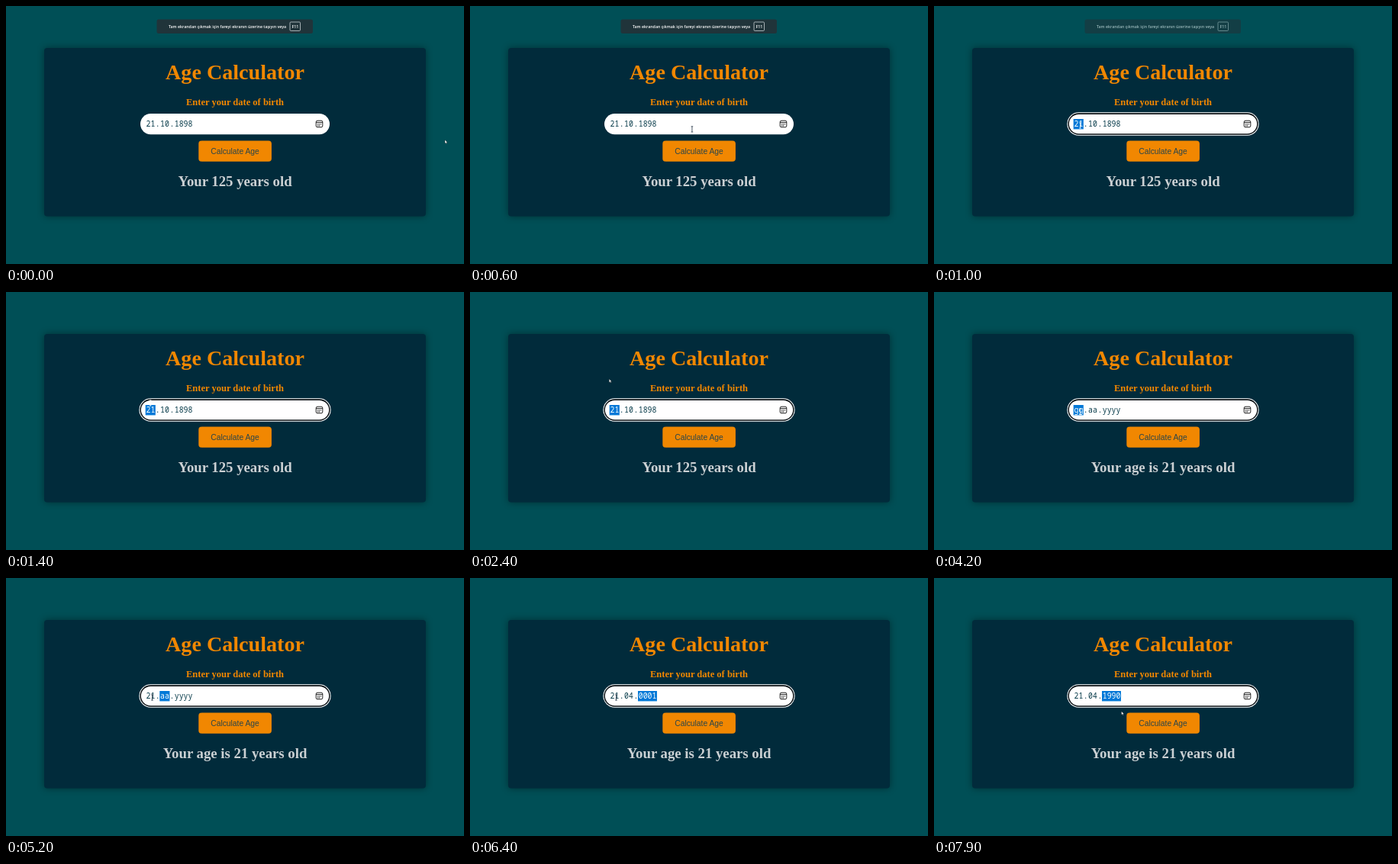
Animation of 600x338 px, one loop 8 s. Source, as an HTML page:

```html
<!DOCTYPE html>
<html lang="en">
<head>
<meta charset="utf-8">
<title>Age Calculator</title>
<style>
  html, body { margin: 0; width: 100%; height: 100%; overflow: hidden; background: #004f56; }
  svg { display: block; width: 600px; height: 338px; }
  .serif { font-family: "Liberation Serif", serif; font-weight: bold; text-anchor: middle; }
  .date { font: 9.85px "Noto Sans Mono", monospace; }
  .toast { font: 600 5.28px "Open Sans", sans-serif; fill: #fff; }
  .panel { filter: drop-shadow(0 0 5px #0006); }
</style>
</head>
<body>
<svg viewBox="0 0 600 338">
  <rect width="600" height="338" fill="#004f56"/>
  <rect class="panel" x="50" y="55" width="500" height="220.5" rx="4" fill="#012b3b"/>

  <g id="toast" class="toast">
    <rect x="197.5" y="17.5" width="204.5" height="18.5" rx="2.5" fill="#20343a"/>
    <text x="213" y="28.5">Tam ekrandan çıkmak için fareyi ekranın üzerine taşıyın veya</text>
    <rect x="372" y="21" width="13.5" height="11.5" rx="1.2" fill="none" stroke="#c8d0d2" stroke-width=".8"/>
    <text x="378.8" y="28.8" text-anchor="middle">F11</text>
  </g>

  <g class="serif">
    <text x="300" y="96" font-size="28.125" fill="#f18701">Age Calculator</text>
    <text x="300" y="130" font-size="12.5" fill="#f18701">Enter your date of birth</text>
    <text id="result" x="300" y="236.3" font-size="18.75" fill="#cbd0d3"></text>
  </g>

  <g id="ring">
    <rect x="174.4" y="139.3" width="251.2" height="30.4" rx="15.2" fill="#fff"/>
    <rect x="175.4" y="140.3" width="249.2" height="28.4" rx="14.2" fill="#0b1115"/>
  </g>
  <rect id="field" fill="#fff"/>
  <g id="date" class="date"></g>

  <g fill="none" stroke="#222" stroke-width="1">
    <rect x="406.2" y="150.2" width="8.6" height="8.6" rx="1.8"/>
    <path d="M406.2 152.6h8.6"/>
    <path d="M408 154.9h5M408 156.9h3.2" stroke-width="1.1" stroke-dasharray="1.1 .8"/>
  </g>

  <rect x="252.3" y="176.4" width="95.6" height="27.4" rx="4" fill="#f18701"/>
  <text x="300" y="193.6" text-anchor="middle" font-family="Liberation Sans, sans-serif" font-size="10.3" fill="#2b464a">Calculate Age</text>

  <path id="arrow" d="M0 0V4.4L1.1 3.5L1.8 5L2.6 4.6L1.9 3.2H3.2Z" fill="#fff" stroke="#111" stroke-width=".3"/>
  <path id="beam" d="M-1.3-3.6H1.3M0-3.6V3.6M-1.3 3.6H1.3" fill="none" stroke-width=".8"/>
</svg>
<script>
const $ = id => document.getElementById(id);
const LOOP = 8000, STEP = 100;

// start time, date shown, selected part (-1: not focused)
const states = [
  [0, '21.10.1898', -1],
  [1000, '21.10.1898', 0],
  [2600, 'gg.aa.yyyy', -1],
  [4200, 'gg.aa.yyyy', 0],
  [4500, '02.aa.yyyy', 0],
  [5200, '21.aa.yyyy', 1],
  [5600, '21.00.yyyy', 1],
  [6000, '21.04.yyyy', 2],
  [6400, '21.04.0001', 2],
  [6800, '21.04.0019', 2],
  [7000, '21.04.0199', 2],
  [7300, '21.04.1990', 2]
];
// pointer: time, x, y
const path = [
  [0, 575, 175.5], [900, 191.5, 156.5], [1200, 191.5, 156.5], [1800, 182.3, 114],
  [2700, 182.3, 114], [3300, 191.5, 156.5], [7700, 191.5, 156.5], [7900, 245.6, 174.8]
];
const partX = [183.5, 202.1, 220.8];
const ease = k => k * k * (3 - 2 * k);
const clamp = k => Math.min(1, Math.max(0, k));

function pointerAt(t) {
  const i = path.findLastIndex(p => p[0] <= t);
  const a = path[i], b = path[i + 1] || a;
  const k = b === a ? 0 : ease((t - a[0]) / (b[0] - a[0]));
  return [a[1] + (b[1] - a[1]) * k, a[2] + (b[2] - a[2]) * k];
}

function setField(focused) {
  const inset = focused ? .9 : 0;
  const box = { x: 176 + inset, y: 141 + inset, width: 248 - 2 * inset, height: 27.2 - 2 * inset, rx: 13.6 - inset };
  for (const key in box) $('field').setAttribute(key, box[key]);
  $('ring').style.display = focused ? '' : 'none';
}

function dateMarkup(date, selected) {
  return date.split('.').map((part, i) => {
    const x = partX[i], on = i === selected, width = part.length * 5.91;
    const mark = on ? `<rect x="${x - .8}" y="148" width="${width + 1.3}" height="13.4" fill="#0078d7"/>` : '';
    const dot = i < 2 ? `<text x="${x + 12.3}" y="158.4" fill="#063a49">.</text>` : '';
    return `${mark}<text x="${x}" y="158.4" fill="${on ? '#fff' : '#063a49'}">${part}</text>${dot}`;
  }).join('');
}

function draw(t) {
  const [, date, selected] = states.findLast(s => s[0] <= t);
  setField(selected >= 0);
  $('date').innerHTML = dateMarkup(date, selected);
  $('result').textContent = t < 2600 ? 'Your 125 years old' : 'Your age is 21 years old';
  $('toast').style.opacity = 1 - clamp((t - 800) / 500);

  const [x, y] = pointerAt(t);
  const overText = x > 176 && x < 400 && y > 141 && y < 168;
  for (const [id, shown] of [['arrow', !overText], ['beam', overText]]) {
    $(id).setAttribute('transform', `translate(${x} ${y})`);
    $(id).style.display = shown ? '' : 'none';
  }
  $('beam').setAttribute('stroke', selected === 0 ? '#fff' : '#234');
}

let last = -1;
function frame() {
  const t = Math.floor(performance.now() % LOOP / STEP) * STEP;
  if (t !== last) draw(last = t);
  requestAnimationFrame(frame);
}
frame();
</script>
</body>
</html>
```
